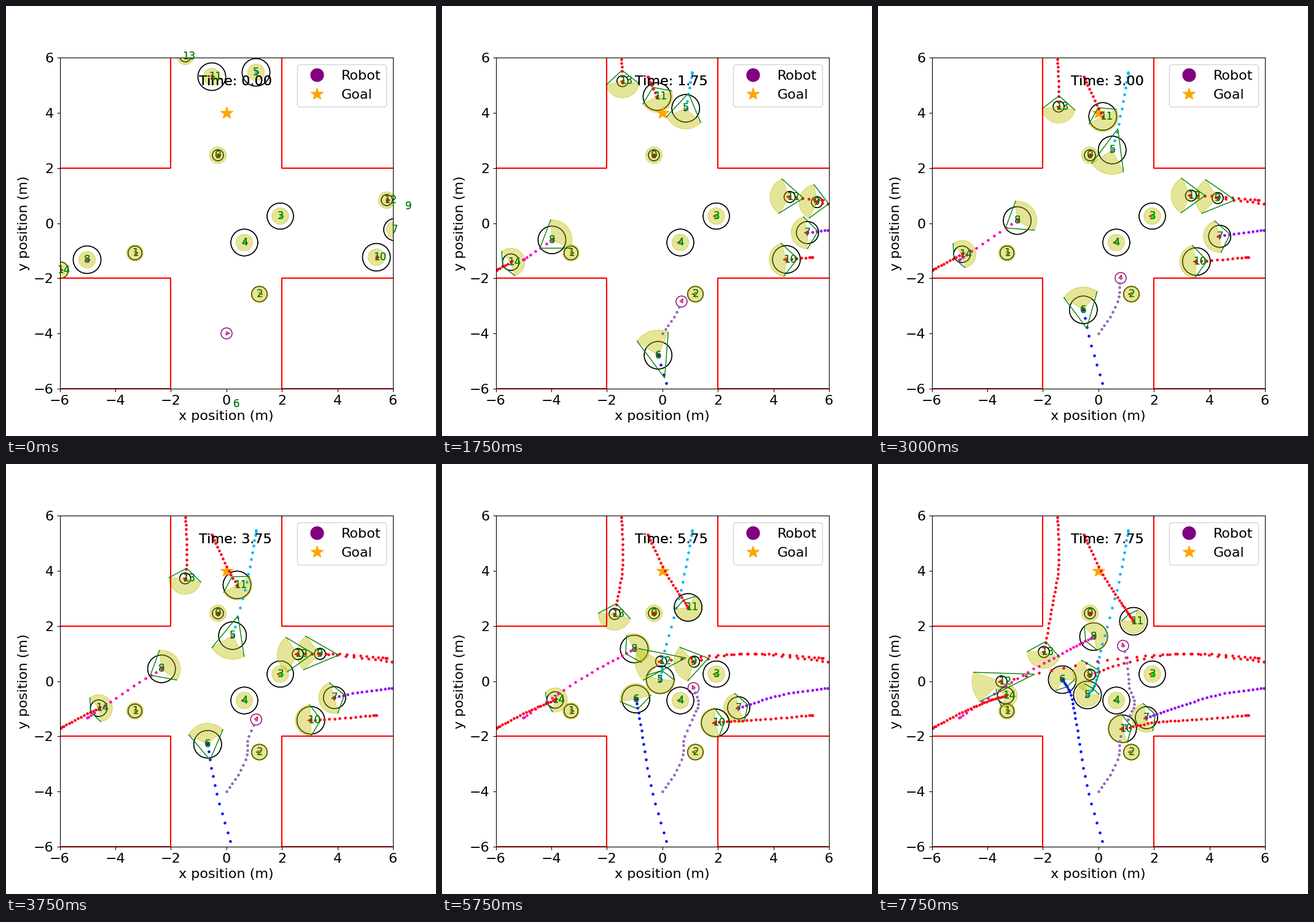
A matplotlib script that plays this animation: 700 px wide and 700 px high, repeating every 8 s.

```python
import math

import matplotlib.pyplot as plt
import numpy as np
from matplotlib.animation import FuncAnimation
from matplotlib.lines import Line2D
from matplotlib.patches import ArrowStyle, Circle, FancyArrowPatch, Wedge

plt.rcParams["font.family"] = "DejaVu Sans"

FRAMES, DT = 32, 0.25
BODY = 0.3          # radius of the resting personal zone
ROBOT_R = 0.2
LAG = 0.65          # seconds a walker needs to get up to speed
CLOCK = np.arange(FRAMES) * DT
EASED = CLOCK - LAG * (1 - np.exp(-CLOCK / LAG))


def to_metres(points):
    """Stage pixels to axis units."""
    return (np.array(points, float) - (358.75, 353.5)) / (45.208, -44.917)


def track(*points, clock=EASED):
    """Smooth path through evenly timed way-points, sampled once per frame."""
    p = to_metres(points)
    slope = np.gradient(p, axis=0)
    pos = clock / clock[-1] * (len(p) - 1)
    i = np.minimum(pos.astype(int), len(p) - 2)
    u = (pos - i)[:, None]
    rise = u * u * (3 - 2 * u)
    return (p[i] * (1 - rise) + p[i + 1] * rise
            + u * (1 - u) * ((1 - u) * slope[i] - u * slope[i + 1]))


def still(x, y):
    return np.repeat(to_metres([(x, y)]), FRAMES, axis=0)


# body radius and path of each person
people = [
    (0.2, still(345, 243)),
    (0.25, still(210, 402)),
    (0.28, still(412.5, 469)),
    (0.475, still(446.5, 342)),
    (0.485, still(388, 385)),
    (0.5, track((407, 108), (390, 200), (363, 302), (354, 356), (341, 376))),
    (0.5, track((375, 648), (341, 528), (325, 436), (314, 377), (300, 351))),
    (0.4, track((633, 364), (556, 375), (492, 394), (437, 413))),
    (0.5, track((132, 413), (227, 349), (304, 306), (351, 281))),
    (0.2, track((655, 326), (583, 316), (487, 309), (401, 324), (345, 343))),
    (0.5, track((603, 409), (518, 416), (454, 420), (398, 431))),
    (0.5, track((335, 115), (366, 180), (397, 228), (416, 256))),
    (0.2, track((620, 316), (536, 309), (452, 311), (341, 324), (201, 354))),
    (0.2, track((292, 82), (294, 164), (283, 233), (270, 306))),
    (0.3, track((88, 430), (137, 404), (179, 386), (208, 377))),
]
robot = track((359, 533), (377, 507), (392, 475), (394, 446), (409, 412),
              (417, 389), (409, 363), (406, 332), (399, 296), clock=CLOCK)

fig, ax = plt.subplots(figsize=(7, 7), dpi=100)
ax.set(xlim=(-6, 6), ylim=(-6, 6),
       xticks=range(-6, 7, 2), yticks=range(-6, 7, 2))
ax.tick_params(labelsize=16)
ax.set_xlabel("x position (m)", fontsize=16)
ax.set_ylabel("y position (m)", fontsize=16)

# corridor walls
for sx in (-1, 1):
    for sy in (-1, 1):
        ax.plot([6 * sx, 2 * sx, 2 * sx], [2 * sy, 2 * sy, 6 * sy], "r", lw=1.5)
    ax.plot([2 * sx, 6 * sx], [-6, -6], "r", lw=1.5, zorder=2.6)

goal = Line2D([0], [4], color="orange", marker="*", ls="None", ms=15)
ax.add_line(goal)
key = Line2D([], [], color="purple", marker="o", ls="None", ms=15)
ax.legend([key, goal], ["Robot", "Goal"], fontsize=16, loc="upper right")

hues = plt.get_cmap("hsv", 10)
paths = [path for _, path in people] + [robot]
colors = [hues(i) for i in range(len(people))] + ["tab:purple"]
trails = [ax.plot([], [], "o", color=c, ms=3.3, mew=0)[0] for c in colors]
clocks = [ax.text(-1, 5, "", fontsize=16) for _ in range(2)]
labels = [[ax.text(0, 0, str(i), color="green", fontsize=12) for _ in range(2)]
          for i in range(len(people))]
head = ArrowStyle("->", head_length=4, head_width=2)
moving = []


def add(patch):
    moving.append(ax.add_patch(patch))


def polar(pos, r, a):
    return pos[0] + r * math.cos(a), pos[1] + r * math.sin(a)


def motion(path, k):
    """Speed and heading over the last step."""
    vx, vy = (path[k] - path[k - 1]) / DT if k else (0, 0)
    return math.hypot(vx, vy), math.atan2(vy, vx)


def draw_zone(pos, speed, heading):
    """Sector that grows longer and narrower with speed, with its tail."""
    if speed == 0:
        add(Wedge(pos, BODY, 0, 360, color="y", alpha=0.4))
        return
    reach = BODY + 0.42 * speed
    half = (11 * math.pi * math.exp(-1.3 * speed) + math.pi) / 12
    add(Wedge(pos, reach, math.degrees(heading - half),
              math.degrees(heading + half), color="y", alpha=0.4))
    # tail sides touch the resting zone
    lean = math.pi - half - math.acos(BODY / reach)
    tail = polar(pos, BODY / math.cos(lean), heading + math.pi)
    ends = [polar(pos, reach, heading + s * half) for s in (-1, 1)]
    xs, ys = zip(ends[0], tail, ends[1])
    moving.extend(ax.plot(xs, ys, color="green", lw=1))


def draw_arrow(pos, heading):
    add(FancyArrowPatch(tuple(pos), polar(pos, ROBOT_R, heading),
                        color="red", arrowstyle=head, zorder=1.9))


def update(k):
    while moving:
        moving.pop().remove()
    for trail, path in zip(trails, paths):
        trail.set_data(path[:k + 1, 0], path[:k + 1, 1])
    for i, (radius, path) in enumerate(people):
        pos = path[k]
        speed, heading = motion(path, k)
        if k and speed == 0 and i > 1:
            heading = math.pi
        for _ in range(2):
            add(Circle(pos, radius, fill=False, ec="black", lw=1))
        draw_zone(pos, speed, heading)
        draw_arrow(pos, heading)
        for text in labels[i]:
            text.set_position(pos - 0.11)
    add(Circle(robot[k], ROBOT_R, fill=False, ec="purple", lw=1))
    draw_arrow(robot[k], motion(robot, k)[1])
    for text in clocks:
        text.set_text(f"Time: {k * DT:.2f}")
    return []


anim = FuncAnimation(fig, update, frames=FRAMES, init_func=lambda: update(0),
                     interval=250, repeat=True, repeat_delay=0)
plt.show()
```
